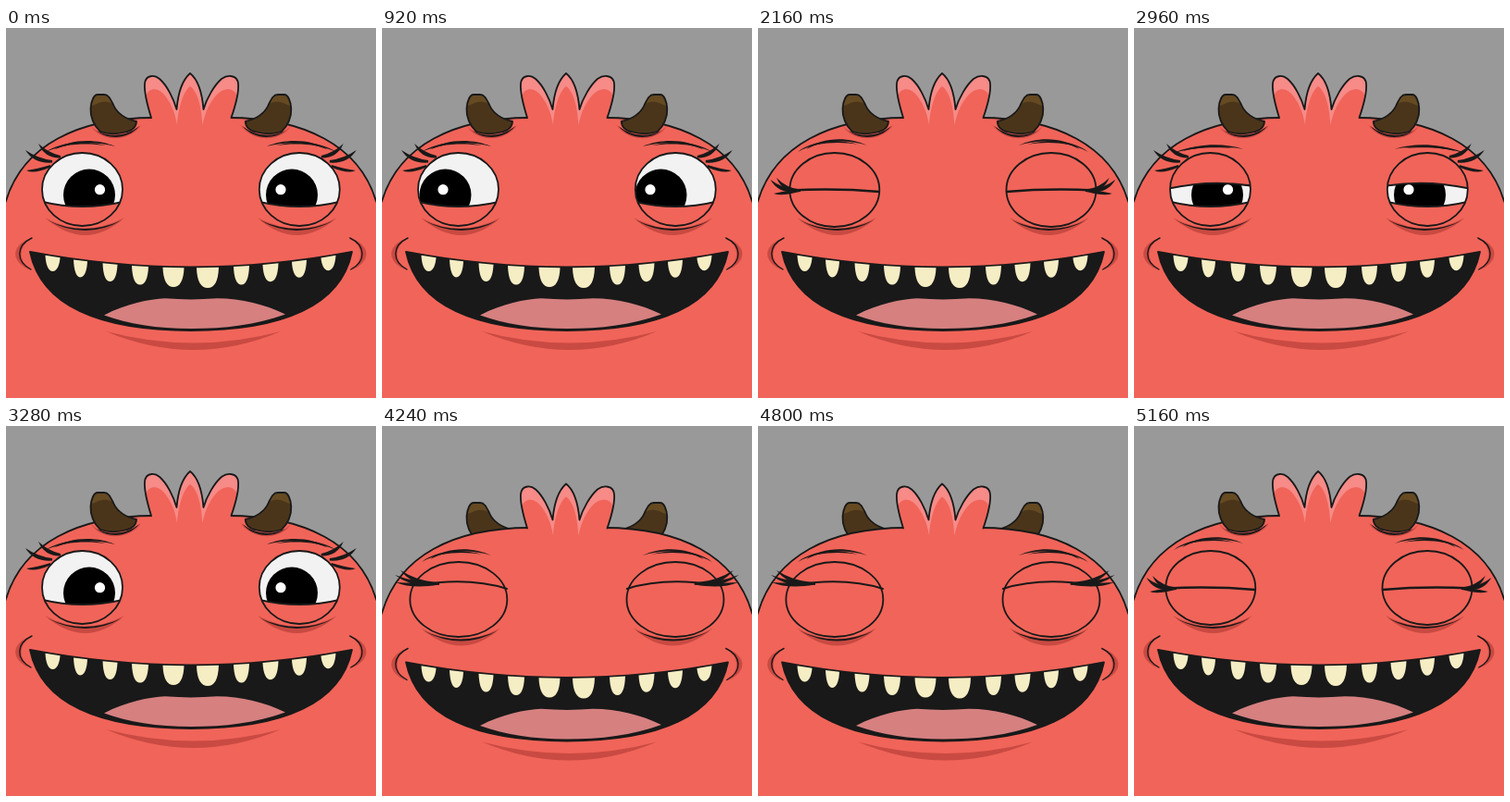
Write an HTML page that moves like this. It is 400 px wide and 400 px high and loops after 5.2 s.

```html
<!DOCTYPE html>
<html lang="en">
<head>
<meta charset="utf-8">
<title>Blinking monster</title>
<style>
  html, body { margin: 0; width: 100%; height: 100%; overflow: hidden; background: #999; }
  svg { display: block; width: 100%; height: 100%; }
</style>
</head>
<body>
<svg id="stage" viewBox="0 0 400 400"></svg>
<script>
const LOOP = 5200;
const INK = '#191919', SKIN = '#f16459', SHADE = '#c94a42', PINK = '#f68b88';
const stage = document.getElementById('stage');

// [start ms, eye pose, body lowered]
const timeline = [
  [0, 'center', 0], [680, 'half', 0], [760, 'closed', 0],
  [920, 'left', 0], [1480, 'half', 0], [1560, 'closed', 0],
  [1640, 'right', 0], [2080, 'half', 0], [2160, 'closed', 0],
  [2240, 'center', 0], [2960, 'half', 0], [3040, 'closed', 0],
  [3120, 'half', 0], [3200, 'closed', 0], [3280, 'center', 0],
  [4040, 'half', 0], [4080, 'closed', 0],
  [4240, 'closed', 1], [4400, 'closed', 0], [4560, 'closed', 1],
  [4680, 'closed', 0], [4800, 'closed', 1], [4960, 'closed', 0],
  [5080, 'closed', 1], [5160, 'closed', 0]
];

// Pupil and highlight x for the left and right eye
const gaze = {
  center: [[90, 101.5], [309, 297]],
  right: [[97.5, 109], [330.5, 333]],
  left: [[68.5, 66], [301.5, 290]]
};
gaze.half = gaze.center;

// Centre x, width, height
const teeth = [
  [50.5, 16, 16], [80.5, 15, 18], [112.5, 16, 19], [145, 18, 20], [181, 23, 21],
  [218, 24, 22], [254.5, 17, 20], [286, 17, 19], [317, 16, 18], [348.5, 16, 15]
];

const fill = (d, color) => `<path d="${d}" fill="${color}"/>`;
const line = (d, width = 1.8, color = 'none') =>
  `<path d="${d}" fill="${color}" stroke="${INK}" stroke-width="${width}" stroke-linejoin="round" stroke-linecap="round"/>`;
const shift = (y, art) => `<g transform="translate(0 ${y})">${art}</g>`;
const flip = art => `<g transform="translate(399.8 0) scale(-1 1)">${art}</g>`;
const both = art => art + flip(art);
const oval = (x, y, rx, ry) =>
  `M${x - rx} ${y}a${rx} ${ry} 0 1 0 ${2 * rx} 0a${rx} ${ry} 0 1 0 ${-2 * rx} 0Z`;
const disc = (x, y, r, color) => fill(oval(x, y, r, r), color);

function head(low) {
  const [side, bend, top] = low ? [202, 140, 110] : [187, 127, 97];
  return line(`M-3 410V${side + 7}L0 ${side}C18 ${bend} 78 ${top} 160 ${top}H240C322 ${top} 382 ${bend} 400 ${side}L403 ${side + 7}V410Z`, 1.8, SKIN);
}

function horn() {
  const shape = 'M102 112C95 106 91 96 91.5 87C92 79 95 72 99 72H106C111 72 113 77 116 83C120 92 128 98 141 101C141 107 136 111 131 112C121 115 110 115 102 112Z';
  return fill(shape, '#4b351a')
    + fill('M92 84C93 77 96 72 99 72H106C111 72 113 77 116 83C113 80 108 79 104 80C98 81 95 84 92 84Z', '#654a22')
    + line(shape);
}

function hornFold() {
  return fill('M91 104C97 115 120 123 146 105C134 124 100 124 91 104Z', SHADE)
    + fill('M98 111C110 118 130 118 144 106C132 121 110 121 98 111Z', INK);
}

function tuft() {
  const top = 'M157 97C153 84 149 70 150 60C151 51 160 50 166 55C174 62 181 76 184.5 88C186 70 191 56 199 49C208 56 212 70 213.5 88C217 76 225 62 233 55C240 50 250 51 251 60C252 70 248 84 243.5 97';
  return fill(top + 'L212.5 105L199 97L185 105Z', PINK)
    + fill('M158 98C154 89 151 80 151.5 74C153 65 163 64 169 70C178 79 183 92 185 105C186 88 191 69 199 63C208 69 211.5 88 212.5 105C215 91 221 78 230 70C237 64 248 65 249.5 74C250 80 247 89 243 98V106H158Z', SKIN)
    + line(top);
}

// Crescent running from a fine tip to a thick root
const lash = (x1, y1, x2, y2, sag) => {
  const x = x1 + (x2 - x1) * .45, y = (y1 + y2) / 2 + sag;
  return fill(`M${x1} ${y1}Q${x} ${y} ${x2} ${y2 - 1}V${y2 + 1.5}Q${x - 4} ${y + 6} ${x1} ${y1}Z`, INK);
};

const taper = (x1, y1, x2, y2, peak, thick) =>
  fill(`M${x1} ${y1}C${x1 + 16} ${peak - 2} ${x2 - 20} ${peak - 3} ${x2} ${y2}C${x2 - 20} ${peak - 3 + thick} ${x1 + 18} ${peak - 2 + thick} ${x1} ${y1}Z`, INK);

const brow = (y, rise) =>
  taper(52, y + rise * .6, 118, y, y - rise, 3) + taper(43, y + rise, 108, y - 1, y - rise * .6, 2.5);

function closedEye(low) {
  if (low) {
    return line(oval(82.8, 187.5, 52.5, 40.5))
      + line('M38 172Q94 163 135 176', 2)
      + lash(14, 161, 62, 170, 4) + lash(20, 156, 58, 170, 4) + lash(15, 169, 62, 170, 1)
      + brow(140, 7);
  }
  return line(oval(82.8, 175, 48.5, 40))
    + line('M35 175.5Q85 173 131 177', 2.4)
    + lash(13.5, 164, 42, 175.5, 4) + lash(20, 162, 46, 175.5, 5) + lash(17, 179, 44, 175.5, -1)
    + brow(127, 7);
}

function openEye(pose) {
  const half = pose === 'half';
  const lid = half ? 'M36 174Q82 163 130 171' : 'M36 130H130';
  const area = lid + 'L130 187Q82 199 36 187Z';
  const ball = oval(82.5, 174.5, 43.5, 39.5);
  const id = 'eye' + pose;
  const look = (x, shine) => disc(x, 180.5, 28, '#000') + disc(shine, 174.7, 5.6, '#fff');
  const socket = inner => `<g clip-path="url(#${id})"><g clip-path="url(#ball)">${fill('M30 130H135V220H30Z', '#f2f2f2')}${inner}</g></g>`;
  const trim = `<g clip-path="url(#ball)">${line('M36 187Q82 199 130 187')}${half ? line(lid, 2) : ''}</g>`
    + line(ball)
    + lash(21, 132, 50, 144, 3) + lash(35, 125, 59, 139, 3) + lash(22, 154, 48, 149, 1)
    + (half ? brow(131, 4) : brow(128, 6));
  const [[lx, ls], [rx, rs]] = gaze[pose];
  const defs = `<clipPath id="ball"><path d="${ball}"/></clipPath><clipPath id="${id}"><path d="${area}"/></clipPath>`;
  return defs + socket(look(lx, ls)) + trim
    + flip(socket(look(399.8 - rx, 399.8 - rs)) + trim);
}

function tooth([x, w, h]) {
  const lip = px => 242 + 66 * ((px - 26) / 348) * (1 - (px - 26) / 348) + .7;
  const a = x - w / 2, b = x + w / 2, bottom = lip(x) + h;
  return fill(`M${a} ${lip(a)}L${b} ${lip(b)}C${b - .5} ${bottom - 7} ${x + w * .3} ${bottom} ${x} ${bottom}C${x - w * .3} ${bottom} ${a + .5} ${bottom - 7} ${a} ${lip(a)}Z`, '#f5edc4');
}

function mouth() {
  return line('M26 242Q200 275 374 242C362 300 300 327 200 327C100 327 38 300 26 242Z', 1.8, INK)
    + fill('M106 310.5C130 298 155 293 172 292.3Q200 294.5 228 292.3C255 292.5 280 299 302 309.5C270 321 237 325 200 325C163 325 132 320 106 310.5Z', '#d68080')
    + teeth.map(tooth).join('')
    + fill('M108 328Q203 353 297 328Q203 368 108 328Z', SHADE);
}

function cheek() {
  return fill('M28 227C5 234 4 253 27 262C13 252 13 236 28 227Z', SHADE)
    + line('M28 227C11 235 10 252 27 261', 1.4);
}

function bag() {
  return fill('M42 205Q84 228 128 205Q86 243 42 205Z', SHADE)
    + fill('M45 208Q84 226 125 208Q86 230 45 208Z', INK);
}

function draw(pose, low) {
  const drop = low ? 13.5 : 0;
  const horns = shift(low ? 11 : 0, both(horn()));
  const eyes = pose === 'closed' ? both(closedEye(low)) : openEye(pose);
  return fill('M0 0H400V400H0Z', '#999')
    + (low ? horns + head(low) : head(low) + both(hornFold()) + horns)
    + shift(drop, tuft())
    + shift(drop, both(bag())) + eyes
    + shift(drop, both(cheek()) + mouth());
}

let shown;
function update(now) {
  const t = now % LOOP;
  const step = timeline.findLast(entry => entry[0] <= t);
  if (step !== shown) {
    shown = step;
    stage.innerHTML = draw(step[1], step[2]);
  }
}

const start = performance.now();
function tick() {
  update(performance.now() - start);
  requestAnimationFrame(tick);
}
tick();
</script>
</body>
</html>
```
